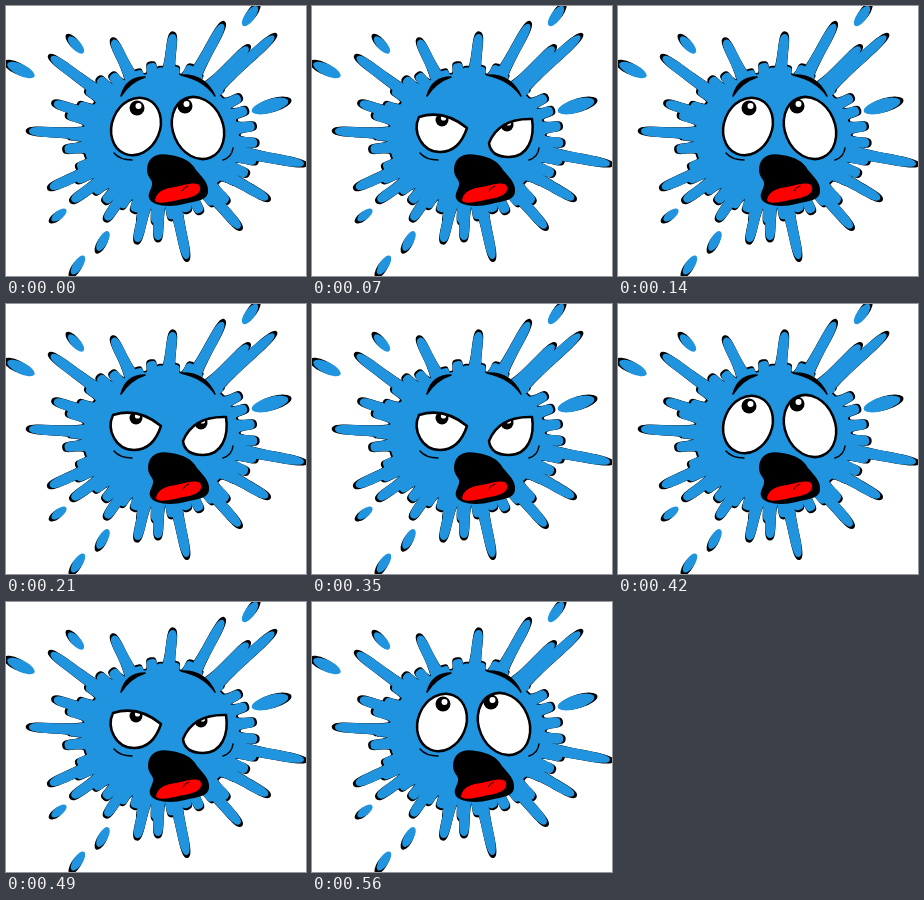
These frames come from a looping animation (300 by 270 pixels, 630 ms). An HTML page with a canvas:

```html
<!DOCTYPE html>
<html lang="en">
<head>
<meta charset="utf-8">
<title>Startled splat</title>
<style>
html, body { margin: 0; width: 100%; height: 100%; overflow: hidden; background: #fff; }
canvas { display: block; }
</style>
</head>
<body>
<canvas id="stage" width="300" height="270"></canvas>
<script>
const ctx = document.getElementById('stage').getContext('2d');
const BLUE = '#2094df', BLACK = '#000', WHITE = '#fff', RED = '#f00';
const STEP = 70, STEPS = 9;
const BODY = { x: 155, y: 132, rx: 78, ry: 65 };
const FRINGE = 36;

// Tips of the long arms; every arm grows straight out of the body's centre
const armTips = [
  [45, 51], [107, 34], [167, 28], [217, 18], [242, 41], [268, 30],
  [298, 158], [262, 193], [234, 222], [181, 253], [152, 234], [131, 236],
  [100, 214], [66, 195], [44, 182], [23, 125], [48, 97]
];

// Loose drops: x, y, half length
const drops = [
  [15, 64, 15], [70, 39, 11], [244, 10, 12], [264, 100, 19],
  [53, 209, 9], [97, 235, 11], [72, 259, 11]
];

const angleTo = (x, y) => Math.atan2(y - BODY.y, x - BODY.x);
const edgeRadius = angle =>
  1 / Math.hypot(Math.cos(angle) / BODY.rx, Math.sin(angle) / BODY.ry);

// A petal with a wide foot, a narrow neck and a round tip
function armPath(angle, length) {
  const c = Math.cos(angle), s = Math.sin(angle);
  const foot = edgeRadius(angle) * 0.95;
  const neck = foot + (length - foot) * 0.4;
  const at = (d, side) => [BODY.x + d * c - side * s, BODY.y + d * s + side * c];
  const path = new Path2D();
  path.moveTo(...at(foot, -8));
  path.bezierCurveTo(...at(neck, -2), ...at(length, -9), ...at(length, 0));
  path.bezierCurveTo(...at(length, 9), ...at(neck, 2), ...at(foot, 8));
  return path;
}

function fringePath(_, i) {
  const random = Math.abs(Math.sin(i * 127.1 + 3) * 437.5) % 1;
  const angle = (i + random * 0.4) / FRINGE * Math.PI * 2;
  const reach = 1.13 + 0.06 * Math.sin(angle) + 0.14 * random;
  return armPath(angle, edgeRadius(angle) * reach);
}

function ellipsePath(x, y, rx, ry, tilt = 0) {
  const path = new Path2D();
  path.ellipse(x, y, rx, ry, tilt, 0, Math.PI * 2);
  return path;
}

const splat = [
  ellipsePath(BODY.x, BODY.y, BODY.rx, BODY.ry),
  ...Array.from({ length: FRINGE }, fringePath),
  ...armTips.map(([x, y]) => armPath(angleTo(x, y), Math.hypot(x - BODY.x, y - BODY.y))),
  ...drops.map(([x, y, r]) => ellipsePath(x, y, r, 2 + r / 4, angleTo(x, y)))
];

function fill(path, color) {
  ctx.fillStyle = color;
  ctx.fill(path);
}

function line(path, width) {
  ctx.strokeStyle = BLACK;
  ctx.lineWidth = width;
  ctx.stroke(path);
}

// The black copy is slightly larger, so it shows at the outer tips
function drawSplat() {
  ctx.save();
  ctx.translate(BODY.x, BODY.y);
  ctx.scale(1.025, 1.025);
  ctx.translate(-BODY.x, -BODY.y);
  splat.forEach(path => fill(path, BLACK));
  ctx.restore();
  splat.forEach(path => fill(path, BLUE));
}

function drawEye(shape, x, y, r) {
  fill(shape, WHITE);
  ctx.save();
  ctx.clip(shape);
  fill(ellipsePath(x, y, r, r), BLACK);
  fill(ellipsePath(x + 1.5, y - 2, r * 0.4, r * 0.4), WHITE);
  ctx.restore();
  line(shape, 2.5);
}

function drawOpenEyes() {
  drawEye(ellipsePath(130, 120.5, 24, 29.5, 0.4), 131, 102, 7.5);
  drawEye(ellipsePath(192, 122, 25, 32, -0.4), 179, 100, 7.5);
}

const leftLid = new Path2D('M107 111Q132 103 155 122C150 137 141 146 128 146C110 146 100 126 107 111Z');
const rightLid = new Path2D('M177 137Q187 112 220 113C223 132 216 151 197 151C184 151 178 145 177 137Z');

function drawHalfClosedEyes() {
  drawEye(leftLid, 130, 114, 6.5);
  drawEye(rightLid, 195, 119, 6.5);
}

const brows = new Path2D('M115 90Q120 71 139 71Q124 76 115 90ZM175 69Q199 68 209 90Q198 74 175 69Z');
const cheeks = new Path2D('M108 147Q114 154 126 154M217 154Q226 151 227 142');
const mouth = new Path2D('M141 164C141 151 151 146 164 149C177 151 185 155 190 164C196 171 203 177 202 186C201 195 189 195 178 198C164 202 145 200 143 192C141 186 149 180 145 174C142 170 141 167 141 164Z');
const tongue = new Path2D('M149 194C151 184 161 182 169 181C178 179 193 174 194 181C196 190 182 192 172 194C163 196 150 199 149 194Z');
const tongueFold = new Path2D('M176 185Q178 181 182 180');

function drawFace(shift) {
  fill(brows, BLACK);
  line(brows, 1.5);
  line(cheeks, 1.5);
  ctx.save();
  ctx.translate(shift, 0);
  fill(mouth, BLACK);
  fill(tongue, RED);
  line(tongueFold, 1);
  ctx.restore();
}

function draw(time) {
  const squinting = Math.floor(time / STEP) % STEPS % 2;
  ctx.fillStyle = WHITE;
  ctx.fillRect(0, 0, 300, 270);
  ctx.lineCap = ctx.lineJoin = 'round';
  drawSplat();
  if (squinting) drawHalfClosedEyes();
  else drawOpenEyes();
  drawFace(squinting);
}

let start;
function tick(now) {
  start ??= now;
  draw(now - start);
  requestAnimationFrame(tick);
}
draw(0);
requestAnimationFrame(tick);
</script>
</body>
</html>
```
